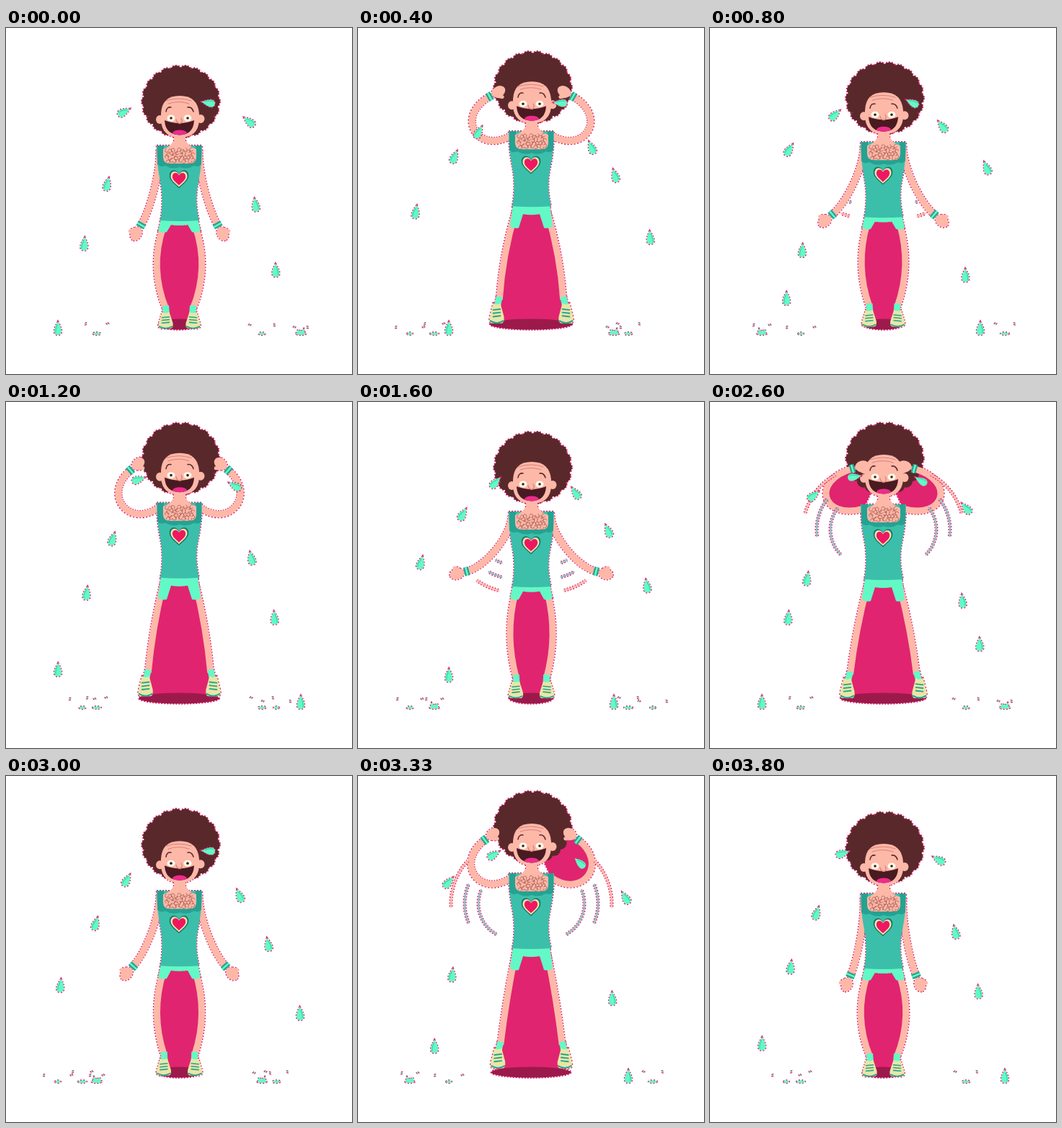
Write an HTML page with a canvas that moves like this. It is 480 px wide and 480 px high and loops after 3.87 s.

```html
<!DOCTYPE html>
<html lang="en">
<head>
<meta charset="utf-8">
<title>Jumping jacks</title>
<style>
html, body { margin: 0; width: 100%; height: 100%; overflow: hidden; background: #fff; }
canvas { display: block; width: 100vmin; height: 100vmin; }
</style>
</head>
<body>
<canvas id="stage" width="480" height="480"></canvas>
<script>
const ctx = document.getElementById('stage').getContext('2d');
const LOOP = 3870, STEPS = 58, JUMPS = 5, CYCLE = STEPS / JUMPS, MID = 240.5;
const C = {
  skin: '#fdb8a8', line: '#d98078', hair: '#59282b', pink: '#e1246f', shade: '#9c1a4b',
  shirt: '#3bbfaa', trim: '#25a292', mint: '#63f9c6', cream: '#e9e6a6', red: '#ee1762',
  mouth: '#4a1a22', haze: '#9cbfc6'
};

// key poses of one jump: step, shoulder y, sole y, foot distance from the middle, arm angle
const POSES = [
  [0, 163, 417, 19, .24],
  [.8, 152, 411, 21.5, .68],
  [2.6, 127, 398, 38, 1.8],
  [4.2, 142, 411, 50, 2.87],
  [5.2, 148, 412, 50, 2.9],
  [7.8, 133, 405.5, 41, 1.82],
  [10.6, 163, 417, 19, .165]
];

// smooth periodic curve through the key poses
function sample(rows, x) {
  const n = rows.length;
  const at = i => {
    const [pos, ...rest] = rows[(i + n) % n];
    return [pos + Math.floor(i / n) * CYCLE, ...rest];
  };
  let i = 0;
  while (i < n - 1 && rows[i + 1][0] <= x) i++;
  const a = at(i - 1), b = at(i), c = at(i + 1), d = at(i + 2), h = c[0] - b[0];
  const u = (x - b[0]) / h, u2 = u * u, u3 = u2 * u;
  return b.slice(1).map((v, k) => {
    const j = k + 1;
    const m0 = (c[j] - a[j]) / (c[0] - a[0]) * h, m1 = (d[j] - b[j]) / (d[0] - b[0]) * h;
    return (2 * u3 - 3 * u2 + 1) * v + (u3 - 2 * u2 + u) * m0 + (3 * u2 - 2 * u3) * c[j] + (u3 - u2) * m1;
  });
}

let fringe = false;
const path = d => new Path2D(d);

function oval(x, y, rx, ry = rx, turn = 0) {
  const p = new Path2D();
  p.ellipse(x, y, rx, ry, turn, 0, 7);
  return p;
}

function edge(p, width) {
  ctx.setLineDash([2, 2]);
  ctx.lineWidth = width;
  ctx.lineCap = 'butt';
  ctx.strokeStyle = C.pink;
  ctx.stroke(p);
  ctx.setLineDash([]);
}

function fill(p, color) {
  if (fringe) return edge(p, 2.4);
  ctx.fillStyle = color;
  ctx.fill(p);
}

function stroke(p, color, width, cap = 'round') {
  if (fringe) return edge(p, width + 2.4);
  ctx.lineWidth = width;
  ctx.lineCap = cap;
  ctx.strokeStyle = color;
  ctx.stroke(p);
}

// dotted pink rim first, solid shapes on top
function inked(draw) {
  fringe = true;
  draw();
  fringe = false;
  draw();
}

function mirrored(draw) {
  for (const right of [false, true]) {
    ctx.save();
    if (right) ctx.transform(-1, 0, 0, 1, 2 * MID, 0);
    draw(right);
    ctx.restore();
  }
}

function placed(x, y, draw, turn = 0, sx = 1, sy = sx) {
  ctx.save();
  ctx.translate(x, y);
  ctx.rotate(turn);
  ctx.scale(sx, sy);
  draw();
  ctx.restore();
}

// the arm keeps its length: the nearer the wrist, the deeper the bow
function bentArm(x, y, angle) {
  const chord = 112 - 19 * angle, ux = -Math.sin(angle), uy = Math.cos(angle);
  const bow = 3 + 1.05 * (112 - chord), along = Math.max(0, (chord - 62) * .6);
  const wx = x + ux * chord, wy = y + uy * chord;
  const dx = ux * along - uy * bow, dy = uy * along + ux * bow;
  return {
    wx, wy, aim: Math.atan2(dy, dx),
    arm: `M${x} ${y}C${x + ux * along + uy * bow} ${y + uy * along - ux * bow} ${wx - dx} ${wy - dy} ${wx} ${wy}`
  };
}

function pose(p) {
  const [y, sole, spread, angle] = sample(POSES, p);
  const [before] = sample(POSES, Math.max(0, p - .25));
  const hem = y + 103, open = Math.min(1, Math.max(0, (spread - 19) / 20));
  const shoe = 23 + 5 * open, foot = MID - spread;
  const ankle = foot + (spread - 19) * .13, ankleY = sole - shoe - 5;
  const bend = Math.max(0, 170 - (sole - hem)) * 1.1;
  return {
    p, y, sole, angle, hem, open, shoe, foot, ankle, ankleY,
    top: Math.min(y, before) - 111,
    knee: [(218 + ankle) / 2 - bend, (hem + 10 + ankleY) / 2],
    ...bentArm(213, y + 6, angle)
  };
}

function backdrop(s) {
  const { knee: [kx, ky], ankle: x, ankleY: y } = s, flip = v => 2 * MID - v;
  if (s.sole > 402) {
    fill(path(`M218 ${s.hem + 8}Q${kx} ${ky} ${x} ${y}V411H${flip(x)}V${y}Q${flip(kx)} ${ky} 263 ${s.hem + 8}Z`), C.pink);
  }
  fill(oval(240, 411, MID - s.foot + 9, 7.5), C.shade);
  mirrored(right => {
    if (s.p > (right ? 3.4 : 4) && s.p < 5.5) fill(path(`${s.arm}L${MID} ${s.top + 60}Z`), C.pink);
  });
}

function leg(s) {
  stroke(path(`M218 ${s.hem + 10}Q${s.knee} ${s.ankle} ${s.ankleY}`), C.skin, 9, 'butt');
  stroke(path(`M${s.ankle} ${s.ankleY - 4}L${s.foot + 1} ${s.sole - s.shoe + 3}`), C.mint, 9, 'butt');
  placed(s.foot, s.sole, () => {
    fill(path('M-5 -24Q0 -21 5 -24L10 -8Q11 0 6 0H-6Q-11 0 -10 -7Z'), C.cream);
    if (fringe) return;
    for (const y of [-8, -12, -16]) stroke(path(`M-5 ${y}L5 ${y - 1}`), C.trim, 1.6);
    stroke(path('M-9 -3Q0 2 9 -3'), C.trim, 1.8);
  }, 0, 1, s.shoe / 24);
}

function shorts({ hem: y, open }) {
  const cuff = y + 17 + 14 * open, crotch = y + 7 + 5 * open;
  fill(path(`M215 ${y - 2}L211 ${cuff - 2}Q217 ${cuff + 2} 223 ${cuff}L229 ${crotch}
    Q240 ${crotch + 2} 252 ${crotch}L258 ${cuff}Q264 ${cuff + 2} 270 ${cuff - 2}L266 ${y - 2}Z`), C.mint);
}

function hair({ top }) {
  const p = oval(242.5, top + 50, 49, 45);
  for (let i = 0; i < 22; i++) {
    const a = i / 22 * Math.PI * 2;
    p.addPath(oval(242.5 + 45.5 * Math.cos(a), top + 50 + 41.5 * Math.sin(a), 8.8));
  }
  fill(p, C.hair);
}

function arm(s) {
  stroke(path(s.arm), C.skin, 9);
  placed(s.wx, s.wy, () => {
    fill(oval(14, 0, 10, 7.5), C.skin);
    stroke(path('M9 4L15 9'), C.skin, 5);
    if (fringe) return;
    stroke(path('M0 -6V6'), C.trim, 7, 'butt');
    stroke(path('M0 -6V6'), C.mint, 2.5, 'butt');
  }, s.aim);
}

function torso({ y }) {
  placed(0, y, () => {
    fill(path('M209 0H272Q272 26 267 50Q261 76 268 104Q241 106 214 104Q219 76 214 50Q209 26 209 0Z'), C.shirt);
    if (fringe) return;
    fill(path('M210 0H219V22H263V0H271V26Q267 31 261 28Q251 34 241 30Q231 34 221 28Q214 31 210 26Z'), C.trim);
    fill(path('M218 5Q228 2 232 -6H250Q254 2 264 5V16Q264 25 254 25H228Q218 25 218 16Z'), C.skin);
    for (let i = 0; i < 36; i++) {
      const row = i % 4, x = 223 + Math.floor(i / 4) * 4.3 + (row % 2) * 2;
      const curl = new Path2D();
      curl.arc(x, 7 + row * 4.8 + Math.sin(i * 2.3) * 1.5, 2.4, i, i + 4.4);
      stroke(curl, '#a85b50', .8);
    }
    const heart = path('M0 12C-5 7 -13 2 -12 -5C-11 -12 -3 -12 0 -6C3 -12 11 -12 12 -5C13 2 5 7 0 12Z');
    [[1.1, '#176f69'], [.96, C.cream], [.76, C.red]].forEach(([size, color]) =>
      placed(240, 46, () => fill(heart, color), 0, size));
  });
}

function face({ y }) {
  // the origin lies level with the eyes
  placed(0, y - 38, () => {
    stroke(path('M241 18V41'), C.skin, 16, 'butt');
    fill(oval(213.5, 2, 5.5, 6), C.skin);
    fill(oval(270, 1, 5.5, 6), C.skin);
    fill(path('M215 -6Q216 -31 241 -31Q266 -31 268 -6V4Q266 27 241 27Q217 27 215 4Z'), C.skin);
    if (fringe) return;
    stroke(path('M222 -24Q240 -30 257 -24M225 -20Q240 -25 254 -20'), C.line, 1);
    stroke(path('M222 -9Q223 -16 229 -15M252 -15Q258 -16 260 -9'), C.hair, 1.5);
    const grin = path('M220 3Q241 11 261 3Q260 23 241 23.5Q221 23 220 3Z');
    fill(grin, C.mouth);
    ctx.save();
    ctx.clip(grin);
    fill(oval(241, 21, 10, 4.5), '#ee2b8b');
    ctx.restore();
    for (const x of [229, 252]) {
      fill(oval(x, 0, 5.5, 4.5), '#fffbe8');
      fill(oval(x, 0, 1.8), '#33222a');
    }
    fill(oval(241, 3, 4.5, 5), C.skin);
    stroke(path('M236 2Q237 8 242 7Q246 5 243 0'), C.line, 1.3);
  });
}

// three concentric arcs trail the rising hands
function speedLines({ p, angle }) {
  if (p < .4 || p > 4.9) return;
  mirrored(() => [C.skin, C.haze, C.haze].forEach((color, i) => {
    const length = Math.min(i < 2 ? .8 : 1.45, angle - .3 - .1 * i);
    if (length <= 0) return;
    const tip = Math.PI / 2 + angle * (i ? .78 : .92), line = new Path2D();
    line.arc(216, 177, 87 - 19 * i, tip - length, tip);
    inked(() => stroke(line, color, 2.6));
  }));
}

// sweat flies out in near, middle and far arcs and lands after FALL steps
const FALL = 12, SPURTS = 6;
const ARCS = [{ reach: 74, delay: 0 }, { reach: 94, delay: 7 }, { reach: 128, delay: 4 }];

function flight(arc, k) {
  const u = Math.max(0, k) / FALL;
  const drift = 1 - Math.max(0, 1 - u ** 1.25) ** 3;
  return [281 + ARCS[arc].reach * drift, 104 + 313 * u ** (1.47 + .16 * arc)];
}

function drop(arc, k) {
  const [x, y] = flight(arc, k), [x0, y0] = flight(arc, k - .1), [x1, y1] = flight(arc, k + .1);
  placed(x, y, () => {
    inked(() => fill(path('M-10 0C-4 -3 0 -5.5 5 -5Q9 -4 9 0Q9 4 5 5C0 5.5 -4 3 -10 0Z'), C.mint));
    stroke(path('M-5 -1Q2 -4 6 -3'), '#38d3ad', 1.2);
  }, Math.atan2(y1 - y0, x1 - x0));
}

function splash(x, age) {
  const lift = 14 * Math.sin(Math.PI * (age + 1) / 9);
  inked(() => {
    fill(oval(x, 424, 8 - age * .7, 1.8), C.mint);
    if (age < 3) fill(path(`M${x - 6} 424L${x - 4} 418L${x} 421L${x + 4} 417L${x + 6} 424Z`), C.mint);
    for (const side of [-1, 1]) fill(oval(x + side * (7 + 2 * age), 424 - lift, 1.6, .8, side * .6), C.mint);
  });
}

function sweat(step) {
  mirrored(left => ARCS.forEach(({ reach, delay }, arc) => {
    for (let n = -3; n <= SPURTS; n++) {
      const k = step - Math.round(n * STEPS / SPURTS - 7.25 + (left ? 1 : 0)) - delay;
      if (k >= 0 && k <= FALL) drop(arc, k);
      else if (k > FALL && k < FALL + 7) splash(281 + reach, k - FALL);
    }
  }));
}

function draw(now) {
  const step = Math.floor(now % LOOP / LOOP * STEPS + .2) % STEPS;
  const s = pose(step % CYCLE);
  ctx.clearRect(0, 0, 480, 480);
  inked(() => {
    backdrop(s);
    mirrored(() => leg(s));
    shorts(s);
    hair(s);
    mirrored(() => arm(s));
    torso(s);
    face(s);
  });
  speedLines(s);
  sweat(step);
}

const begin = performance.now();
function tick() {
  draw(performance.now() - begin);
  requestAnimationFrame(tick);
}
tick();
</script>
</body>
</html>
```
